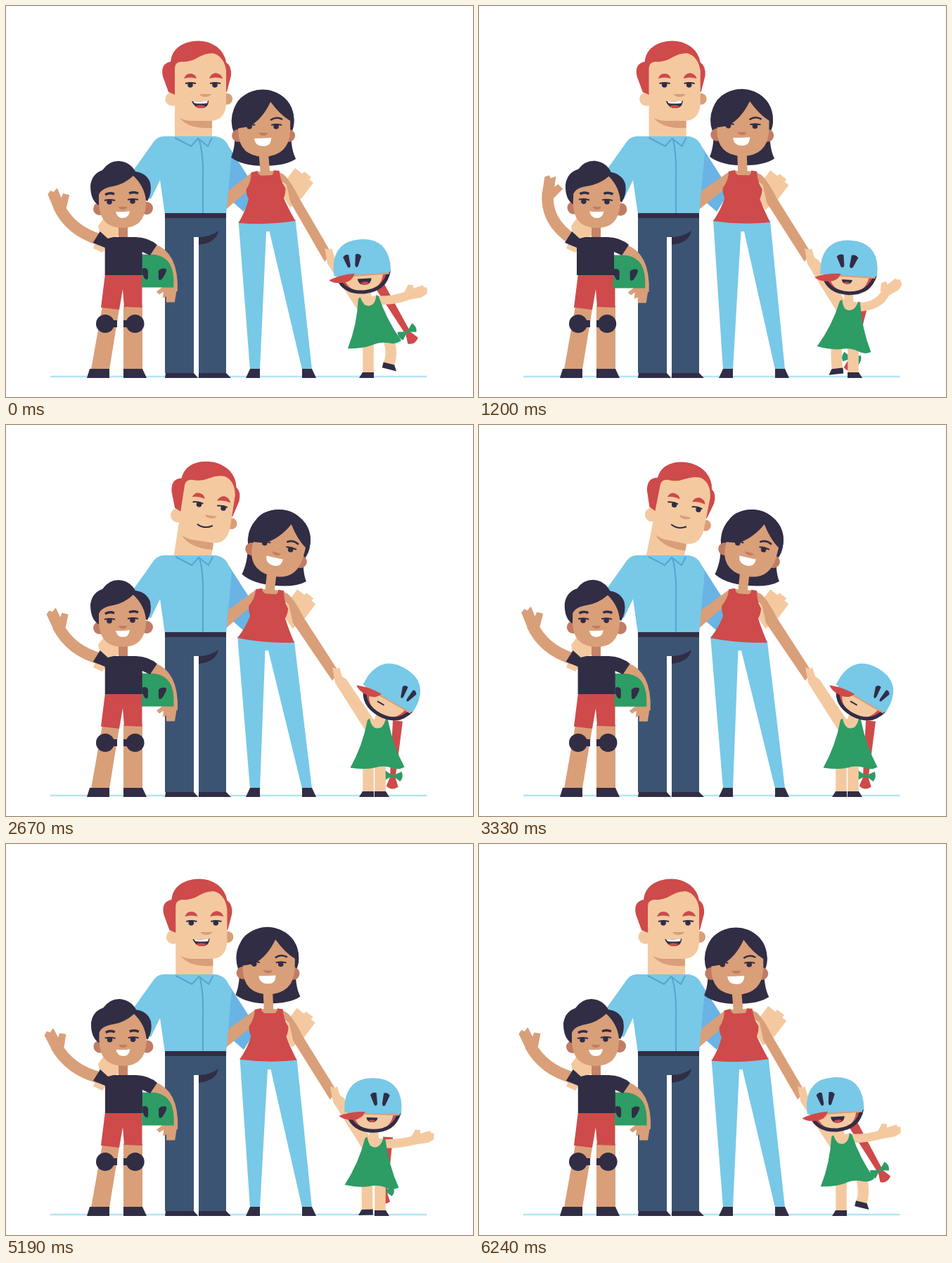
Write an HTML page with a canvas that moves like this. It is 664 px wide and 555 px high and loops after 6270 ms.

```html
<!DOCTYPE html>
<html lang="en">
<head>
<meta charset="utf-8">
<title>Family</title>
<style>
html, body { margin: 0; width: 100%; height: 100%; overflow: hidden; background: #fff; }
canvas { display: block; }
</style>
</head>
<body>
<canvas id="stage" width="664" height="555"></canvas>
<script>
const ctx = document.getElementById('stage').getContext('2d');
const LOOP = 6270, WAVE = LOOP / 7;
const RED = '#cf4a4a', PALE = '#f4c9a0', TAN = '#d99f78', EAR = '#c07c64', NECK = '#c58467';
const DARK = '#312d45', BLUE = '#78c8e8', SHADE = '#69b3e5', SEAM = '#5aa2cf';
const JEANS = '#3c5474', GREEN = '#2d9c65', WHITE = '#fff';

const mix = (a, b, u) => a + (b - a) * u;
const mixAll = (a, b, u) => a.map((v, i) => mix(v, b[i], u));
// A pose is a rest state plus shares of a lean and a look.
const pose = (rest, lean, s, look, g) => rest.map((v, i) => v + lean[i] * s + look[i] * g);

function ramp(t, from, to) {
  const u = Math.min(1, Math.max(0, (t - from) / (to - from)));
  return u * u * (3 - 2 * u);
}
const hold = (t, in0, in1, out0, out1) => ramp(t, in0, in1) - ramp(t, out0, out1);
const swing = (t, peak, period) => Math.cos((t - peak) / period * 2 * Math.PI);

function fill(d, color) {
  ctx.fillStyle = color;
  ctx.fill(new Path2D(d));
}
function line(d, color, width) {
  ctx.strokeStyle = color;
  ctx.lineWidth = width;
  ctx.stroke(new Path2D(d));
}
function dot(x, y, r, color) {
  ctx.fillStyle = color;
  ctx.beginPath();
  ctx.arc(x, y, r, 0, 7);
  ctx.fill();
}
// Puts the point (ox, oy) at (x, y) and turns around it.
function place(x, y, deg, ox, oy, draw) {
  ctx.save();
  ctx.translate(x, y);
  ctx.rotate(deg * Math.PI / 180);
  ctx.translate(-ox, -oy);
  draw();
  ctx.restore();
}
function spot([x, y, deg], px, py) {
  const a = deg * Math.PI / 180, c = Math.cos(a), s = Math.sin(a);
  return [x + px * c - py * s, y + px * s + py * c];
}
function eye(x, y, look = 0) {
  line(`M${x - 7},${y - 1} Q${x},${y - 3} ${x + 8},${y - 1}`, DARK, 2);
  dot(x + look, y + 1, 3.8, DARK);
}

function drawDadBack(hip) {
  fill('M317,200 L346,245 L352,270 L338,292 L313,270Z', SHADE);
  const shift = (spot(hip, 16, -72)[0] - 384.5) / 2;
  place(shift, shift, 0, 0, 0, () =>
    fill('M396,250 L411,230 L421,238 L424,235 L434,243 L431,246 L437,251 L421,272 L404,286 L388,262Z', PALE));
  fill('M170,285 L140,300 L131,312 L133,322 L124,344 L137,350 L152,330 L172,320Z', PALE);
}

function drawDadHead(open, look) {
  dot(314, 132, 8, TAN);
  fill('M240,78 Q272,60 298,64 Q313,74 313,95 V140 Q311,163 290,163 L293,166 V202 H240Z', PALE);
  fill('M247,159 Q255,163 264,163 H293 V173 Q260,175 247,159Z', TAN);
  dot(236.5, 132, 10, PALE);
  fill('M240,126 L231,122 L223,100 Q219,82 234,79 Q236,59 257,52 Q281,45 300,58 Q311,67 313,80 Q321,85 320,99 L314,122 H313 V92 Q310,71 294,67 Q283,67 273,73 Q262,80 249,79 Q240,80 240,88Z', RED);
  fill('M253,103 Q256,95 263,96 Q270,97 271,103 Q262,100 253,103Z', RED);
  fill('M289,103 Q291,96 298,95 Q306,96 308,103 Q298,100 289,103Z', RED);
  eye(262, 111, look * 3);
  eye(297, 111, look * 3);
  fill('M275,125 H292 Q290,129 283,129 Q277,129 275,125Z', TAN);
  if (open < .08) {
    line('M266,140 Q277,146 288,139', DARK, 2);
    return;
  }
  place(276, 135, 0, 0, 0, () => {
    ctx.scale(1, open);
    fill('M-12,0 Q0,2 12,-1 Q12,10 1,10 Q-8,10 -12,0Z', DARK);
    fill('M-10,0 Q0,2 11,-1 L10,3 Q0,4 -8,3Z', WHITE);
    fill('M-7,7 Q0,4 8,7 Q5,10 1,10 Q-4,10 -7,7Z', RED);
  });
}

function drawDad(x, look, open) {
  place(264.5 + x, 172, look * 11.3, 264.5, 172, () => drawDadHead(open, look));
  fill('M226,300 H313 V521 H274 V328 H267 V521 H226Z', JEANS);
  fill('M274,328 Q290,328 302,319 Q299,336 274,339Z', DARK);
  fill('M227,521 H267 L273,528 H226Z M274,521 H313 L320,528 H274Z', DARK);
  fill('M224,185 H298 Q313,187 318,203 L321,209 L313,296 H226 L219,247 L206,274 L178,262 L182,232 L207,197 Q214,185 224,185Z', BLUE);
  fill('M226,294 H313 V301 H226Z', DARK);
  place(x, 0, 0, 0, 0, () =>
    line('M240,187 L263,199 L273,188 L287,199 L293,187', SEAM, 2));
  line(`M${274 + x},188 Q281,210 280,245 V294`, SEAM, 2);
}

function drawBoyHead() {
  dot(133, 288, 9, EAR);
  dot(200, 287, 9, EAR);
  fill('M132,262 L150,240 H181 L199,258 V282 Q197,315 166,315 Q134,315 132,282Z', TAN);
  fill('M132,283 Q120,276 120,255 Q122,238 137,233 Q146,220 160,220 Q176,221 184,235 Q200,237 205,251 Q208,265 201,277 L199,276 Q197,256 181,241 Q168,253 152,256 Q135,259 132,268Z', DARK);
  line('M141,268 Q147,264 154,267 M175,266 Q181,263 188,266', DARK, 3.5);
  eye(147, 277);
  eye(180, 276);
  fill('M160,285 H172 Q171,289 166,289 Q161,289 160,285Z', EAR);
  fill('M156,292 Q166,293 176,291 Q175,301 166,301 Q158,301 156,292Z', WHITE);
}

function drawWaveArm(w) {
  const [cx, cy, ex, ey, deg] = mixAll([94, 306, 98, 265, 4], [91, 322, 70, 288, -34], (1 + w) / 2);
  line(`M134,332 Q${cx},${cy} ${ex},${ey}`, TAN, 16.5);
  place(ex, ey, deg, 0, 0, () =>
    fill('M-8,3 L-6,-22 L0,-25 L3,-21 L10,-24 L9,-9 L14,-13 L21,-7 L9,7Z', TAN));
}

function drawBoy(w, lag) {
  fill('M137,426 L161,430 L147,516 H121Z M167,425 H194 V516 H167Z', TAN);
  line('M141,451 H158 M167,451 H184', DARK, 10);
  dot(141, 451, 13, DARK);
  dot(183 + w * .8, 451, 13, DARK);
  fill('M119,515 H147 V528 H115Z M167,515 H194 L200,528 H167Z', DARK);
  fill('M141,380 H193.5 V428 L168,427 L166,402 L161,431 L135,428Z', RED);
  place(w * 1.3, -w * .6, 0, 0, 0, () => {
    line('M206,345 Q237,355 235,405', TAN, 16);
    fill('M226,396 L213,406 L217,410 L223,406 L222,415 L227,413 L227,421 H239 L242,402Z', TAN);
    fill('M192,353 H204 Q236,353 237.5,388 V400 H192Z', GREEN);
    fill('M193,373 Q199,371 201,376 V386 Q200,391 196,387 L193,381Z', DARK);
    fill('M216,376 Q221,371 227,374 Q228,378 221,388 Q216,392 216,385Z', DARK);
  });
  drawWaveArm(w);
  fill('M160,308 H173 V332 H160Z', NECK);
  place(w, 0, 0, 0, 0, () =>
    fill('M152,328 H184 Q203,329 214,339 L204,354 L193,349 V382 H140 V343 L123,336 L133,320 L144,330Z', DARK));
  place(166, 318, (1 - lag) * 1.6, 166, 318, drawBoyHead);
}

function drawMomFace() {
  dot(330, 184, 9, EAR);
  dot(402, 184, 9, EAR);
  fill('M330,165 L370,134 H382 L404,156 V178 Q402,213 366,214 Q331,213 330,178Z', TAN);
  eye(346, 170);
  eye(384, 170);
  fill('M376,136 Q365,160 346,171 L328,174 Q316,140 340,126 Q365,112 390,126 Q412,140 409,170 L404,163 Q390,155 376,136Z', DARK);
  line('M376,162 Q384,156 393,161', DARK, 2.5);
  fill('M359,180 H372 Q371,184 366,184 Q361,184 359,180Z', EAR);
  fill('M353,188 Q365,188 377,187 Q377,199 366,199 Q354,199 353,188Z', WHITE);
}

function drawMomBackArm(hip) {
  const [x, y] = spot(hip, -19, -72), [ax, ay] = spot(hip, -26, -45);
  fill(`M${x + 6},${y} L${x},${y + 1} L310,267 V291 L${ax},${ay} L${ax + 12},${ay}Z`, TAN);
}

function drawMom(head, hip, hand) {
  const [lx, ly] = spot(hip, -40.5, 0), [rx, ry] = spot(hip, 40.5, 0);
  const mid = (lx + rx) / 2;
  fill(`M${lx},${ly - 2} L${rx},${ry - 2} L435,516 H421 L${mid + 3.5},320 H${mid - 1} L361,516 H347Z`, BLUE);
  fill('M347,515 H361 V528 H341Z M421,515 H435 L441,528 H421Z', DARK);

  const [hx, hy, tilt] = head;
  place(hx, hy, tilt, 366, 184, () => dot(365, 163, 44.5, DARK));
  // The loose hair follows only part of the tilt.
  place(hx, hy, tilt * .35, 366, 184, () =>
    fill('M324,165 Q328,195 320,215 Q336,227 366,227 Q398,227 412,217 Q403,200 406,165Z', DARK));
  const [sx, sy] = spot(hip, 16, -72), [ix, iy] = spot(hip, 26, -45);
  fill(`M${sx},${sy} L${sx + 10},${sy + 5} Q${sx + 20},${sy + 14} ${sx + 32},${sy + 38} L${hand + 5},350 L${hand - 4},363 L${ix + 9},${iy + 18} L${ix + 3},${iy - 8} L${sx},${sy + 12}Z`, TAN);
  place(...hip, 0, 0, () => {
    fill('M-16,-72 H16 V-56 H-16Z', TAN);
    fill('M-20,-71 L-11,-73 Q-10,-66 -5,-66 H7 Q12,-66 12,-73 L20,-72 Q21,-57 28,-47 Q28,-39 25,-33 Q31,-18 40.5,0 Q0,5 -40.5,0 Q-29,-18 -25,-33 Q-28,-39 -28,-47 Q-20,-58 -20,-71Z', RED);
  });
  const [nx, ny] = spot(hip, 0, -67), [cx, cy] = spot(head, 0, 24);
  line(`M${nx},${ny} L${cx},${cy}`, TAN, 13.5);
  place(...head, 366, 184, drawMomFace);
}

function drawBraid([rx, ry, bx, by]) {
  const deg = Math.atan2(by - ry, bx - rx) * 180 / Math.PI, len = Math.hypot(bx - rx, by - ry);
  place(rx, ry, deg, 0, 0, () => {
    fill(`M0,-7 L${len},-4 V4 L0,7Z`, RED);
    fill(`M${len},-3 L${len + 15},-9 Q${len + 22},0 ${len + 15},8 L${len},3Z`, RED);
    fill(`M${len - 2},-3 L${len - 7},-12 Q${len + 1},-16 ${len + 7},-11 L${len + 2},-3 V3 L${len + 7},11 Q${len + 1},16 ${len - 7},12 L${len - 2},3Z`, GREEN);
  });
}

// side is -1 for the left leg and 1 for the right.
function drawLeg(side, lift) {
  const hip = 523.5 + side * 8.5, out = side * lift;
  const ax = hip + out * 13, ay = 520 - lift * 13;
  line(`M${hip + out * 13},474 Q${hip + out * 19},494 ${ax},${ay + 1}`, PALE, 15.5);
  place(ax, ay, out * 15, 0, 0, () => {
    ctx.scale(side, 1);
    fill('M-8,0 H8 L13,8 H-8Z', DARK);
  });
}

function drawGirlArm([sx, sy], w, fold) {
  const open = mixAll([29, 0, 38, -22, -35], [25, 1, 45, -5, -11], (1 + w) / 2);
  const [cx, cy, wx, wy, deg] = mixAll(open, [4, 15, -8, 28, 70], fold);
  line(`M${sx - 6},${sy} Q${sx + cx},${sy + cy} ${sx + wx},${sy + wy}`, PALE, 12.5);
  place(sx + wx, sy + wy, deg, 0, 0, () =>
    fill('M-5,-6 L2,-14 L9,-12 L8,-7 L22,-8 L23,-5 L27,-3 L25,5 L16,8 L-5,6.5Z', PALE));
}

function drawGirlHead(turn, open) {
  fill('M-36,-3 H39 Q35,22 18,24 H-16 Q-32,18 -36,-3Z', RED);
  fill('M-29,-4 H30 Q28,25 1,25 Q-25,25 -29,-4Z', PALE);
  line('M-35,4 Q-27,26 1,26 Q31,25 38,-2', DARK, 5);
  fill('M-36,-2 H38 V3 H-36Z', TAN);
  if (open < .1) {
    line('M-11,11 H0', DARK, 2);
  } else {
    place(mix(-6, 2.5, open), 7, 0, 0, 0, () => {
      ctx.scale(.5 + open * .5, .35 + open * .65);
      fill('M-10,0 H10 Q9,9 0,9 Q-9,9 -10,0Z', DARK);
      fill('M-6,6 Q0,3 6,6 Q3,9 0,9 Q-3,9 -6,6Z', RED);
    });
  }
  fill('M-40.5,1 V-12 Q-37,-49 0,-49 Q37,-49 40.5,-12 V-2 Q40,1 36,1Z', BLUE);
  fill('M-48,6 Q-30,-1 -11,-1 Q-15,10 -27,11 Q-42,12 -48,6Z', RED);
  place(turn, -19, 0, 0, 0, () => {
    ctx.scale(1 - Math.abs(turn) / 70, 1);
    fill('M-16,-6 Q-12,-11 -6,-9 L-4,6 Q-5,11 -9,8Z M16,-6 Q12,-11 6,-9 L4,6 Q5,11 9,8Z', DARK);
  });
}

function drawGirl(head, dress, braid, lean, hand, w, fold) {
  const [hx, hy, deg, turn, open] = head;
  drawBraid(braid);
  drawLeg(-1, Math.max(0, -lean) ** 2);
  drawLeg(1, Math.max(0, lean) ** 2);
  drawGirlArm(spot(dress, 14, -61), w, fold);
  const [sx, sy] = spot(dress, -9, -58);
  fill(`M${hand - 4},344 L${hand + 3},346 L${hand + 6},344 L${hand + 10},357 L${hand + 16},361 L${sx + 6},${sy - 6} L${sx - 5},${sy + 11} L${hand},366Z`, PALE);
  place(...dress, 0, 0, () => {
    fill('M-13,-68 H13 V-50 H-13Z', PALE);
    fill('M-14,-67 L-11,-69 Q-8,-55 0,-55 Q9,-55 12,-69 L15,-67 Q22,-31 38.5,0 Q30,5 20,1 Q8,-3 -4,1 Q-18,4 -38.5,1 Q-21,-30 -14,-67Z', GREEN);
  });
  const [nx, ny] = spot(dress, 0, -58), [cx, cy] = spot(head, 1, 18);
  line(`M${nx},${ny} L${cx},${cy}`, PALE, 13);
  place(hx, hy, deg, 0, 0, () => drawGirlHead(turn, open));
}

function draw(t) {
  const wave = swing(t, 775, WAVE);
  // The dance runs across the loop's seam and rests in the middle.
  const dance = 1 - hold(t, 1500, 2050, 4900, 5500);
  const lean = dance * swing(t > LOOP / 2 ? t - LOOP : t, 60, WAVE * 2);

  const dadLook = hold(t, 2150, 2900, 3800, 4350);
  const dadOpen = 1 - hold(t, 1800, 2500, 3850, 4300);
  const momLook = hold(t, 1300, 2050, 3900, 4900);
  const hipLook = hold(t, 1300, 2400, 4400, 5100);
  const girlLook = hold(t, 2150, 2650, 4420, 5000);
  const fold = hold(t, 2300, 2620, 4420, 4800);

  const momHead = pose([371, 183.5, .5], [-5, .5, -.5], lean, [13, 1.5, 14], momLook);
  const hip = pose([372.5, 306.3, 0], [-1.5, .2, -2], lean, [-3, -.8, 4.5], hipLook);
  const hand = 463 - lean * 6 + girlLook * 5;
  // x, y, tilt, turn of the helmet, mouth
  const girlHead = pose([518, 381, .5, -7, .7], [-11.5, -1, -4.5, -6, .3], lean, [25, 7, 29.5, 0, -.7], girlLook);
  girlHead[3] += 28 * hold(t, 2150, 2650, 4420, 6000);
  const dress = pose([521, 484, 1], [3, -4, -9], lean, [7, 1.5, -1], girlLook);
  const braid = pose([540, 411, 546, 485], [-10, -16, 25, -23], lean, [17, 9, 4, 13], girlLook);

  ctx.fillStyle = WHITE;
  ctx.fillRect(0, 0, 664, 555);
  line('M63,526 H598.5', '#b5e3f7', 2.4);
  drawDadBack(hip);
  drawMomBackArm(hip);
  drawDad(1 - lean, dadLook, dadOpen);
  drawMom(momHead, hip, hand);
  drawBoy(wave, swing(t, 865, WAVE));
  drawGirl(girlHead, dress, braid, lean, hand, wave, fold);
}

const start = performance.now();
function tick() {
  draw((performance.now() - start) % LOOP);
  requestAnimationFrame(tick);
}
tick();
</script>
</body>
</html>
```
